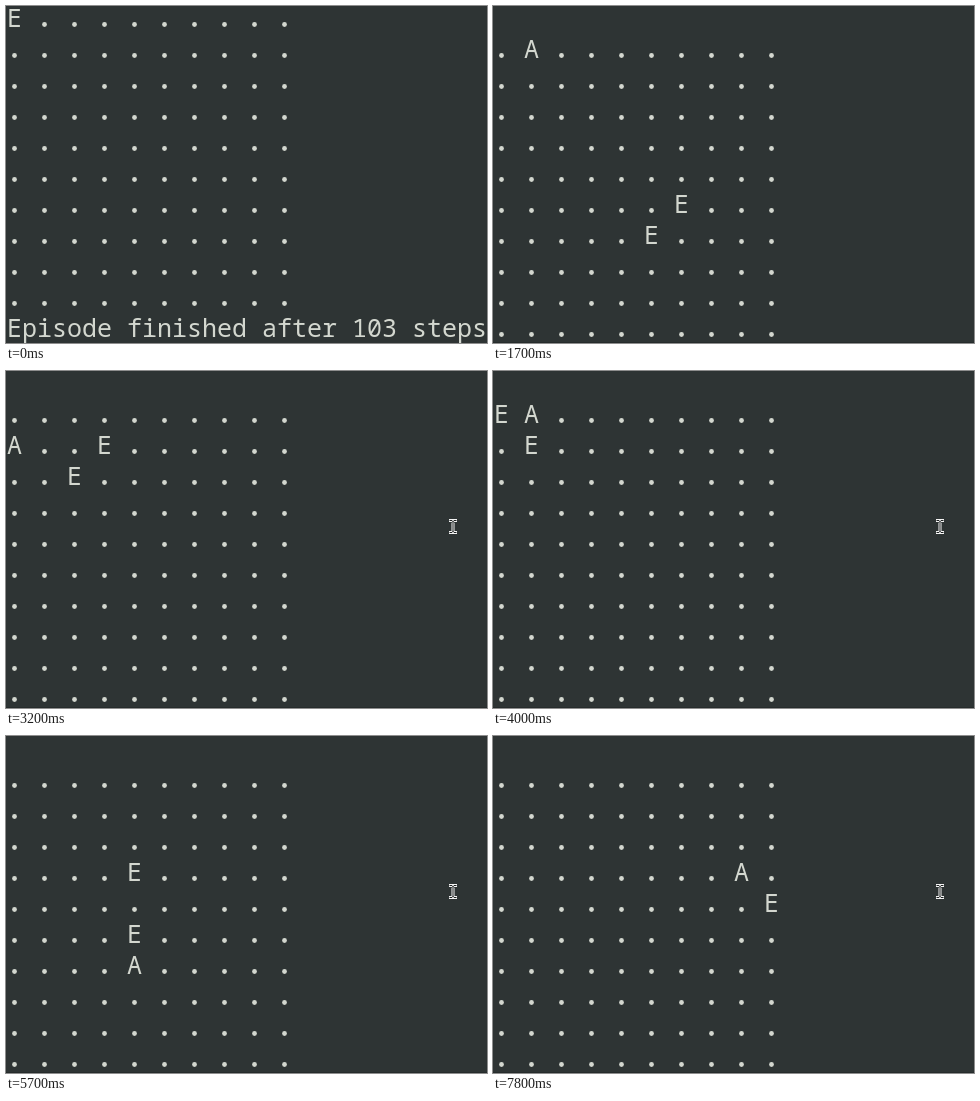
An HTML page for the animation above (8000 ms loop, 481 px wide and 337 px high).

```html
<!DOCTYPE html>
<html lang="en">
<head>
<meta charset="utf-8">
<title>Grid chase</title>
<style>
  html, body { margin: 0; width: 100%; height: 100%; overflow: hidden; background: #2e3434; }
  svg { display: block; width: 481px; height: 337px; }
  text { font: 25px "Noto Sans Mono", "DejaVu Sans Mono", monospace; fill: #d3d7cf; white-space: pre; }
  circle { fill: #d3d7cf; }
</style>
</head>
<body>
<svg viewBox="0 0 481 337">
  <rect width="481" height="337" fill="#2e3434"/>
  <g id="screen">
    <g id="dots"></g>
    <text id="report" x="1" y="331">Episode finished after 103 steps</text>
    <text id="enemy1">E</text>
    <text id="enemy2">E</text>
    <text id="agent">A</text>
  </g>
  <rect id="edge" y="336" width="481" height="1" fill="#262c2c"/>
  <g id="pointer" fill="none">
    <path d="M443 149.5H446L447 150.5L448 149.5H451M447 150V161M443 161.5H446L447 160.5L448 161.5H451" stroke="#f4f4f4" stroke-width="3"/>
    <path d="M443.5 149.5H446L447 150.5L448 149.5H450.5M447 150V161M443.5 161.5H446L447 160.5L448 161.5H450.5" stroke="#1c2020"/>
  </g>
</svg>
<script>
const LOOP = 8000, SIZE = 10, COL = 30, LINE = 31;
const SCROLL_AT = 300, START = 800, POINTER_AT = 2900;

// Moments at which the board is redrawn with a new position.
const ticks = [
  800, 1000, 1200, 1400, 1600, 1700, 2000, 2200, 2400, 2600, 2800, 2900,
  3100, 3300, 3400, 3500, 3800, 4000, 4100, 4300, 4500, 4700, 5000, 5100,
  5400, 5600, 5700, 5900, 6200, 6400, 6600, 6800, 7000, 7100, 7300, 7600, 7800
];
const steps = { U: [0, -1], D: [0, 1], L: [-1, 0], R: [1, 0], ".": [0, 0] };

// One word of moves per tick after the first.
function walk(col, row, moves) {
  const path = [[col, row]];
  for (const word of moves.split(" ")) {
    for (const move of word) {
      col += steps[move][0];
      row += steps[move][1];
    }
    path.push([col, row]);
  }
  return path;
}

const paths = {
  enemy1: walk(8, 8, "U L U L U L U L U U U L L L D LU R U R . D RD R D R L D D R R R D R U R U"),
  enemy2: walk(8, 8, "L U L U L U L U L U L U L D L UU U R D R R DD R RD D L R U R R D D R U R U"),
  agent: walk(0, 0, "R D L U R D U . R D L L D D U UU R R D R D RD R DD D L R R U R D R U R UU L")
};

const $ = id => document.getElementById(id);
const show = (el, on) => el.setAttribute("visibility", on ? "visible" : "hidden");

const dots = [];
for (let i = 0; i < SIZE * SIZE; i++) {
  const dot = document.createElementNS("http://www.w3.org/2000/svg", "circle");
  dot.setAttribute("cx", 8.5 + COL * (i % SIZE));
  dot.setAttribute("cy", 18.5 + LINE * Math.floor(i / SIZE));
  dot.setAttribute("r", 2.4);
  $("dots").append(dot);
  dots.push(dot);
}

function render(t) {
  const playing = t >= START;
  const topLine = playing ? 1 : t >= SCROLL_AT ? -1 : 0;
  $("screen").setAttribute("transform", `translate(0 ${topLine * LINE})`);
  show($("report"), !playing);
  show($("edge"), playing);
  show($("pointer"), t >= POINTER_AT);

  const tick = ticks.filter(time => time <= t).length - 1;
  const taken = new Set();
  for (const id in paths) {
    const [col, row] = playing ? paths[id][tick] : [0, 0];
    const cell = row * SIZE + col;
    const visible = (playing || id === "enemy1") && !taken.has(cell);
    show($(id), visible);
    $(id).setAttribute("x", 1 + COL * col);
    $(id).setAttribute("y", 21 + LINE * row);
    taken.add(cell);
  }
  dots.forEach((dot, cell) => show(dot, !taken.has(cell)));
}

const begin = performance.now();
function frame() {
  render((performance.now() - begin) % LOOP);
  requestAnimationFrame(frame);
}
render(0);
requestAnimationFrame(frame);
</script>
</body>
</html>
```
